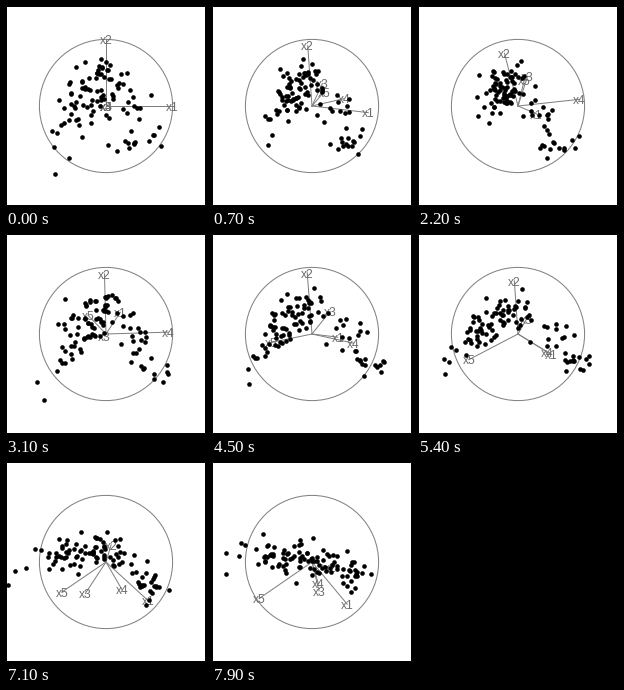
Recreate the animation shown at these times as a matplotlib script. Size 200 by 200 pixels, loop 8000 ms.

```python
import numpy as np
import matplotlib.pyplot as plt
from matplotlib.animation import FuncAnimation
from matplotlib.patches import Circle, Rectangle

SIZE, DPI, FRAMES, STEP_MS = 200, 100, 80, 100
PX = 72 / DPI          # one pixel in points
MID, AXIS_R, DATA_R = 100, 66.6, 100
GREY, TEXT_GREY = "#7f7f7f", "#6c6c6c"


def polar(m):
    """Nearest matrix with orthonormal columns."""
    u, _, vt = np.linalg.svd(m, full_matrices=False)
    return u @ vt


def geodesic(a, b, t):
    """Plane on the geodesic from a (t=0) to b (t=1); t may go beyond."""
    u, s, vt = np.linalg.svd(a.T @ b)
    ang = np.arccos(np.clip(s, 0, 1 - 1e-9))
    g = (a @ u * np.sin((1 - t) * ang) + b @ vt.T * np.sin(t * ang)) / np.sin(ang)
    return polar(g @ polar((1 - t) * u.T + t * vt))


def basis(across, up):
    """Projection from the weights of x1..x5 in both directions."""
    return polar(np.array([across, up]).T)


# Key projections, each lying on one leg of the tour
early = basis([.28, -.21, .14, .92, .09], [-.12, .78, .44, .09, .38])
late = basis([.21, -.03, -.02, .93, -.27], [.32, .89, -.03, .02, .28])
third = basis([.39, -.08, .27, .63, -.62], [-.05, .90, .33, -.14, -.12])
fourth = basis([.58, -.02, -.39, .33, -.63], [-.44, .60, -.32, -.40, -.45])
last = basis([.52, .27, .10, .09, -.80], [-.64, -.08, -.44, -.33, -.57])

# Turning points: the legs run on through the key projections
turns = [np.eye(5, 2), geodesic(early, late, -5 / 9), geodesic(early, late, 11 / 9)]
turns.append(geodesic(turns[2], third, 15 / 11))
turns.append(geodesic(turns[3], fourth, 15 / 12))
turns.append(last)

LEGS = [(0, 16), (17, 16), (34, 15), (50, 15), (66, 13)]   # first step, length


def projection(i):
    k = max(n for n, (first, _) in enumerate(LEGS) if first <= i)
    first, length = LEGS[k]
    return geodesic(turns[k], turns[k + 1], (i - first) / length)


def make_data():
    """Five variables driven by one factor s, bent along x2, with noise."""
    rng = np.random.default_rng(5)
    core = np.clip(rng.normal(-.28, .36, 66), -.9, .5)
    right = 1.04 * np.sqrt(np.linspace(.2, 1, 26))
    left = np.linspace(-.85, -1.36, 10)
    s = np.concatenate([core, right, left])
    n = np.clip(rng.normal(size=(5, s.size)), -1.8, 1.8)
    return np.array([
        .31 * s + .15 * n[0],
        .27 - .60 * s**2 - .12 * s**3 + .11 * n[1],
        .20 * s**2 - .05 + .11 * n[2],
        .30 * s - .09 * n[0] + .09 * n[3],
        -.38 * s + .08 * n[4],
    ]).T


data = make_data()

fig = plt.figure(figsize=(SIZE / DPI, SIZE / DPI), dpi=DPI, facecolor="white")
ax = fig.add_axes([0, 0, 1, 1])
ax.set(xlim=(0, SIZE), ylim=(SIZE, 0))
ax.axis("off")

ax.add_patch(Rectangle((.5, .5), SIZE - 1, SIZE - 1, fill=False, ec="black",
                       lw=PX, snap=False))
ax.add_patch(Circle((MID, MID), AXIS_R, fill=False, ec=GREY, lw=PX))
arms = [ax.plot([], [], color=GREY, lw=PX, zorder=2)[0] for _ in range(5)]
labels = [ax.text(MID, MID, f"x{k + 1}", color=TEXT_GREY, fontsize=12 * PX,
                  family="Liberation Sans", ha="center", va="baseline", zorder=3)
          for k in range(5)]
dots, = ax.plot([], [], "o", color="black", ms=4.6 * PX, mew=0, zorder=4)


def to_stage(points, radius):
    return MID + radius * points * [1, -1]


def draw(i):
    proj = projection(i)
    for arm, label, (x, y) in zip(arms, labels, to_stage(proj, AXIS_R)):
        arm.set_data([MID, x], [MID, y])
        label.set_position((x, y + 4.8))
    dots.set_data(*to_stage(data @ proj, DATA_R).T)
    return [*arms, *labels, dots]


anim = FuncAnimation(fig, draw, frames=FRAMES, interval=STEP_MS,
                     repeat=True, repeat_delay=0, blit=False)
plt.show()
```
